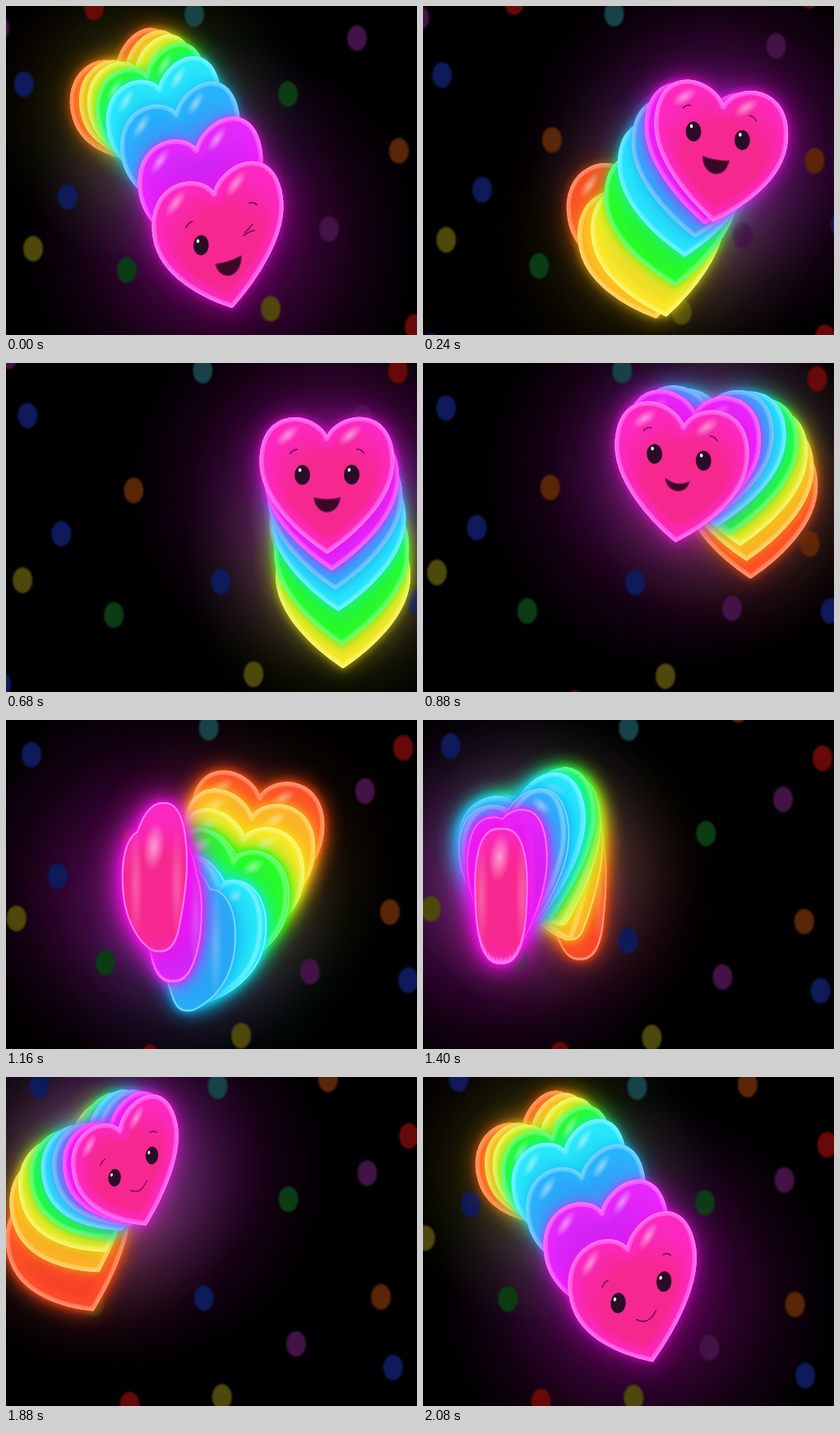
An HTML page with a canvas that plays this animation: 500x400 px, repeating every 2.12 s.

```html
<!DOCTYPE html>
<html lang="en">
<head>
<meta charset="utf-8">
<title>Rainbow heart</title>
<style>
  html, body { margin: 0; width: 100%; height: 100%; overflow: hidden; background: #000; }
  canvas { display: block; width: 500px; height: 400px; }
</style>
</head>
<body>
<canvas id="stage" width="500" height="400"></canvas>
<script>
const ctx = document.getElementById('stage').getContext('2d');
const LOOP = 2120, STEP = 40, END = LOOP - STEP, DELAY = 36, DEPTH = 30;

// Key points of the bouncing flight: time, x, y, roll in degrees.
const FLIGHT = [
  [0, 262, 284, -9], [50, 284, 300, -6], [130, 318, 222, 0], [228, 357, 178, 5],
  [444, 405, 231, 1], [500, 410, 287, 0], [575, 404, 215, 0], [700, 386, 138, 0],
  [800, 347, 112, 2], [880, 313, 134, 4], [1016, 268, 228, 10], [1080, 234, 275, 12],
  [1160, 182, 200, 12], [1270, 133, 158, 12], [1400, 95, 213, 0], [1550, 80, 278, -10],
  [1608, 82, 228, -14], [1680, 91, 144, -18], [1828, 136, 110, -17], [1972, 183, 140, -12],
  [END, 252, 264, -10]
];

// Hue of body and rim, front to back.
const HUES = [[330, 304], [288, 300], [203, 198], [187, 184], [120, 120], [53, 56], [37, 42], [7, 14]];
const SKINS = HUES.map(([body, rim]) => ({
  core: `hsl(${body} 92% 56%)`,
  edge: `hsl(${(body + rim) / 2} 96% 57%)`,
  rim: `hsl(${rim} 100% 73%)`,
  glow: a => `hsl(${rim} 95% 52% / ${a})`
}));

// Lights that turn slowly around one centre, grouped by colour.
const LIGHTS = {
  '#0e1a5a': [[22, 95], [75, 232], [273, 262], [512, 252], [18, 425]],
  '#174247': [[229, 10]],
  '#431246': [[427, 39], [393, 271], [-8, 27]],
  '#0b3c14': [[343, 107], [147, 321]],
  '#5a2608': [[478, 176], [158, 167], [355, -51]],
  '#4e480c': [[33, 295], [322, 368]],
  '#660909': [[465, -24], [217, 421], [107, 2], [497, 390]]
};
const PIVOT = { x: 240, y: 130 }, STRETCH = 1.3, TURN = 0.34;

const HEART = new Path2D('M0-56C14-88 80-96 80-28C80 20 30 62 0 82C-30 62-80 20-80-28C-80-96-14-88 0-56Z');

// Smoothstep from 0 to 1 between two times.
function ease(t, from, to) {
  const u = Math.min(1, Math.max(0, (t - from) / (to - from)));
  return u * u * (3 - 2 * u);
}

// Smooth curve through keyed values.
function at(keys, t) {
  const last = keys.length - 1;
  const i = Math.min(last - 1, Math.max(0, keys.findIndex(k => k[0] > t) - 1 + (t >= keys[last][0] ? last : 0)));
  const a = keys[i], b = keys[i + 1];
  const before = keys[Math.max(0, i - 1)], after = keys[Math.min(last, i + 2)];
  const d = b[0] - a[0], u = (t - a[0]) / d, v = 1 - u;
  return [1, 2, 3].map(n => {
    const m0 = (b[n] - before[n]) / (b[0] - before[0]) * d;
    const m1 = (after[n] - a[n]) / (after[0] - a[0]) * d;
    return a[n] * (1 + 2 * u) * v * v + m0 * u * v * v + b[n] * u * u * (3 - 2 * u) - m1 * u * u * v;
  });
}

// Before the loop starts, the trail follows the end of the last round, a little further on.
function pose(t) {
  const wrapped = t < 0, time = wrapped ? t + END : t;
  const [x, y, roll] = at(FLIGHT, time);
  const yaw = ease(time, 880, 1660) * 2 * Math.PI;
  const away = Math.sin(Math.PI * Math.max(0, time - 1680) / 400);
  return {
    x: x + (wrapped ? 14 : 0), y: y + (wrapped ? 10 : 0), roll,
    size: 1 - 0.15 * away, cos: Math.cos(yaw), sin: Math.sin(yaw)
  };
}

function matrix(p, z = 0, scale = 1) {
  return new DOMMatrix().translate(p.x + z * p.sin, p.y)
    .scale(p.cos, 1).rotate(p.roll).skewY(p.roll).scale(scale * p.size);
}

function slice(p, z, scale) {
  const path = new Path2D();
  path.addPath(HEART, matrix(p, z, scale));
  return path;
}

// Puffy body: a union of slices along its depth.
function solid(p) {
  const path = slice(p), n = Math.abs(p.sin) < 0.02 ? 0 : 24;
  for (let i = 1 - n; i < n; i++) {
    const k = i / n;
    path.addPath(slice(p, k * DEPTH, Math.pow(1 - Math.pow(Math.abs(k), 2.5), 0.4)));
  }
  return path;
}

function radial(x, y, r, ...stops) {
  const g = ctx.createRadialGradient(x, y, 0, x, y, r);
  stops.forEach(([offset, color]) => g.addColorStop(offset, color));
  return g;
}

function ellipse(x, y, rx, ry, fill) {
  ctx.beginPath();
  ctx.ellipse(x, y, rx, ry, 0, 0, 2 * Math.PI);
  ctx.fillStyle = fill;
  ctx.fill();
}

function curve(x0, y0, cx, cy, x1, y1) {
  ctx.beginPath();
  ctx.moveTo(x0, y0);
  ctx.quadraticCurveTo(cx, cy, x1, y1);
  ctx.stroke();
}

function drawLights(t) {
  const angle = TURN * t / END, cos = Math.cos(angle), sin = Math.sin(angle);
  ctx.save();
  ctx.filter = 'blur(1px)';
  for (const [color, spots] of Object.entries(LIGHTS)) {
    for (const [x, y] of spots) {
      const dx = x - PIVOT.x, dy = (y - PIVOT.y) / STRETCH;
      ellipse(PIVOT.x + dx * cos - dy * sin, PIVOT.y + (dx * sin + dy * cos) * STRETCH, 12, 12 * STRETCH, color);
    }
  }
  ctx.restore();
}

function drawHaze(poses) {
  ctx.save();
  ctx.globalCompositeOperation = 'lighter';
  poses.forEach((p, i) => {
    const { glow } = SKINS[i], a = i ? 0.07 : 0.32;
    ctx.fillStyle = radial(p.x, p.y, i ? 190 : 240, [0, glow(a)], [0.4, glow(a * 0.65)], [0.7, glow(a * 0.25)], [1, glow(0)]);
    ctx.fillRect(0, 0, 500, 400);
  });
  ctx.restore();
}

function shine(x, y, length, width, turn, alpha) {
  ctx.save();
  ctx.translate(x, y);
  ctx.rotate(turn);
  ctx.scale(length, width);
  const white = a => `rgba(255,255,255,${a})`;
  ellipse(0, 0, 1, 1, radial(0, 0, 1, [0, white(alpha)], [0.5, white(alpha / 2)], [1, white(0)]));
  ctx.restore();
}

function drawHeart(p, { core, edge, rim, glow }, lead) {
  const body = solid(p);
  ctx.save();
  ctx.lineJoin = 'round';
  ctx.strokeStyle = rim;
  ctx.lineWidth = 4;
  ctx.shadowColor = glow(1);
  for (const blur of lead ? [44, 24, 10] : [26, 10]) {
    ctx.shadowBlur = blur;
    ctx.stroke(body);
  }
  ctx.shadowBlur = 0;
  ctx.fillStyle = radial(p.x + 6, p.y + 12, 92, [0, core], [0.5, core], [1, edge]);
  ctx.fill(body);
  ctx.clip(body);

  if (Math.abs(p.cos) > 0.5) {
    const outline = slice(p);
    ctx.strokeStyle = edge;
    ctx.globalAlpha = 0.35;
    for (let w = 28; w > 8; w -= 6) {
      ctx.lineWidth = w;
      ctx.stroke(outline);
    }
    ctx.strokeStyle = rim;
    ctx.globalAlpha = 0.5;
    for (const w of [7, 4, 2]) {
      ctx.lineWidth = w;
      ctx.stroke(outline);
    }
    ctx.globalAlpha = 1;
    ctx.setTransform(matrix(p));
    for (const x of [-48, 28]) shine(x, -60, 18, 8, -0.7, 0.5);
  } else {
    shine(p.x - 2, p.y - 46, 13, 30, 0.12, lead ? 0.55 : 0.35);
    for (const x of [-24, 26]) shine(p.x + x, p.y, 9, 70, 0, 0.25);
  }
  ctx.restore();
}

function drawEye(x, y) {
  ellipse(x, y, 9.5, 12, '#2a0c26');
  ellipse(x - 3, y - 6, 1.8, 2.2, '#fff');
}

function drawMouth(open) {
  const w = 13 + 3 * open, y = 16, low = y + 11 + 13 * open;
  if (open < 0.15) return curve(-w, y, 0, y + 14, w, y);
  ctx.beginPath();
  ctx.moveTo(-w, y);
  ctx.quadraticCurveTo(0, y + 14 - 11 * open, w, y);
  ctx.bezierCurveTo(w * 0.8, low, -w * 0.8, low, -w, y);
  ctx.fillStyle = '#3a0724';
  ctx.fill();
  ctx.stroke();
}

function drawFace(p, t) {
  if (p.cos < 0.3) return;
  const lean = Math.tanh(-p.roll / 6);
  ctx.save();
  ctx.setTransform(matrix(p, DEPTH * 0.8));
  ctx.translate(5 * lean, 12 * lean);
  ctx.strokeStyle = '#6a0f48';
  ctx.lineCap = 'round';
  ctx.lineWidth = 1.5;
  curve(-45, -38, -42, -43, -36, -43);
  curve(36, -43, 42, -43, 45, -38);
  drawEye(-30, -12);
  if (t < 200) {
    curve(23, -7, 30, -10, 37, -9);
    curve(25, -10, 31, -13, 36, -17);
  } else {
    drawEye(30, -12);
  }
  drawMouth(1 - ease(t, 560, 1160));
  ctx.restore();
}

function draw(t) {
  const poses = SKINS.map((_, i) => pose(t - i * DELAY));
  ctx.fillStyle = '#000';
  ctx.fillRect(0, 0, 500, 400);
  drawHaze(poses);
  drawLights(t);
  for (let i = poses.length - 1; i >= 0; i--) drawHeart(poses[i], SKINS[i], i === 0);
  drawFace(poses[0], t);
}

const start = performance.now();
let shown = -1;
function tick() {
  const t = Math.floor(((performance.now() - start) % LOOP) / STEP) * STEP;
  if (t !== shown) draw(shown = t);
  requestAnimationFrame(tick);
}
tick();
</script>
</body>
</html>
```
